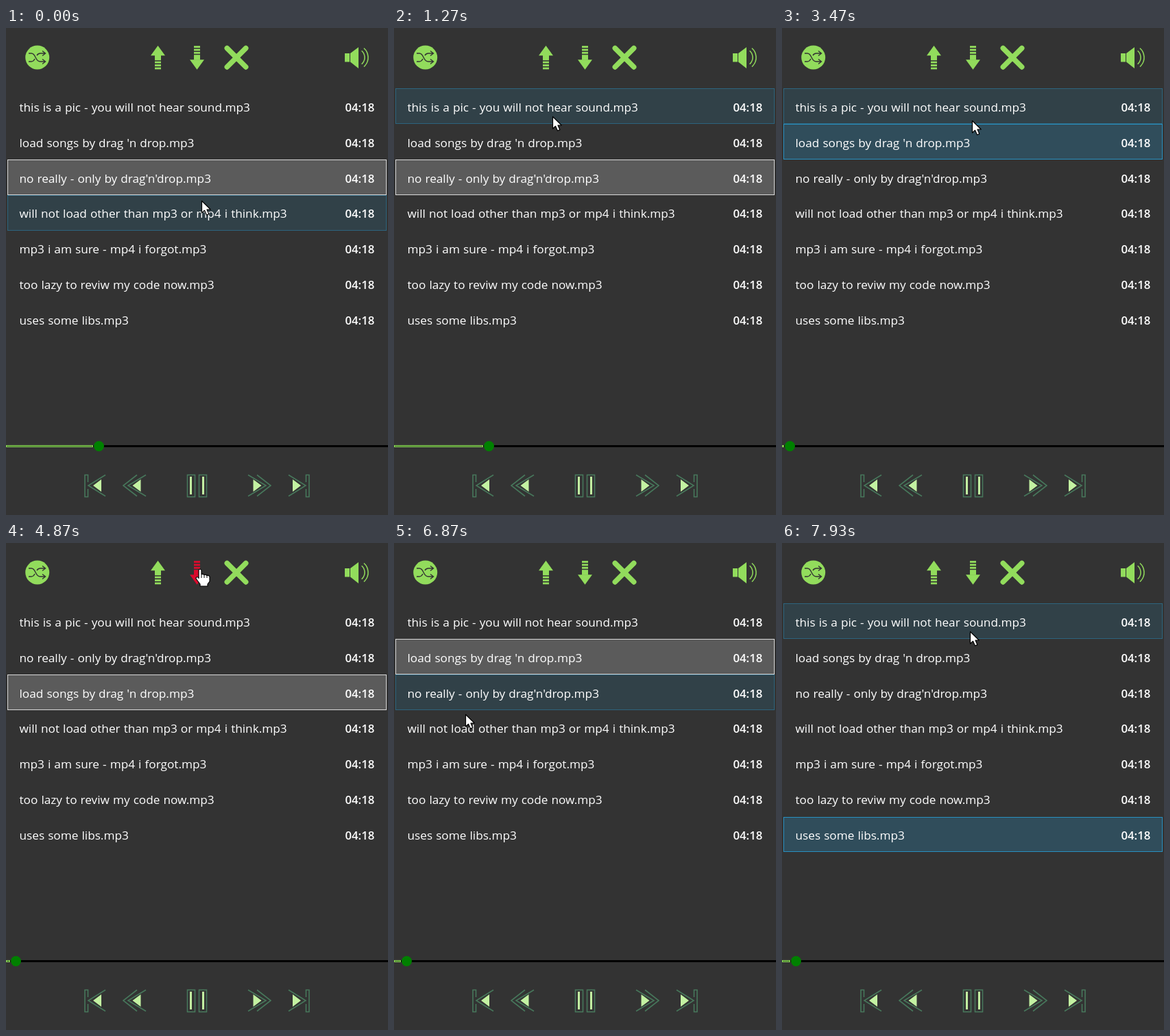
Write an HTML page with a canvas that moves like this. It is 557 by 711 pixels and loops after 8000 ms.

```html
<!DOCTYPE html>
<html lang="en">
<head>
<meta charset="utf-8">
<title>Music player</title>
<style>
  html, body { margin: 0; width: 100%; height: 100%; overflow: hidden; background: #333; }
  canvas { display: block; }
</style>
</head>
<body>
<canvas id="stage" width="557" height="711"></canvas>
<script>
const W = 557, H = 711, LOOP = 8000, STEP = 200 / 3;
const TOP = 88, PITCH = 51.85, MID = 668;
const ctx = document.getElementById('stage').getContext('2d');

const LIME = '#92dc5c', RED = '#dc0a2d', BG = '#333333';
const EDGE = '#47775b', GLOW = '#c3f2a2';

const songs = [
  'this is a pic - you will not hear sound',
  "load songs by drag 'n drop",
  "no really - only by drag'n'drop",
  'will not load other than mp3 or mp4 i think',
  'mp3 i am sure - mp4 i forgot',
  'too lazy to reviw my code now',
  'uses some libs'
];

const rowStyle = {
  hover: ['rgba(38,160,218,.122)', 'rgba(38,160,218,.45)'],
  idle: ['rgba(218,218,218,.24)', '#dadada'],
  active: ['rgba(38,160,218,.24)', 'rgba(38,160,218,.85)']
};

// Places the pointer heads for
const list = { x: 285, y: 252 }, up = { x: 226, y: 41 }, down = { x: 283, y: 38 };
const moves = [
  { from: 130, to: 600, ...up },
  { from: 600, to: 1000, x: 241, y: 89 },
  { from: 1000, to: 1270, x: 231, y: 129 },
  { from: 1400, to: 2200, x: 207, y: 163 },
  { from: 2600, to: 2800, x: 203, y: 169 },
  { from: 2930, to: 3470, x: 277, y: 135 },
  { from: 3470, to: 3800, x: 294, y: 38 },
  { from: 3800, to: 4600, ...down },
  { from: 5400, to: 5730, ...up },
  { from: 6470, to: 6870, x: 104, y: 250 },
  { from: 6870, to: 7530, x: 172, y: 424 },
  { from: 7600, to: 7900, x: 274, y: 129 }
];

const clicks = [2000, 4470, 4930, 5270, 6070, 6270, 6470, 7400];
const RESTART = 2470;

const ease = k => k * k * (3 - 2 * k);
const rowTop = i => Math.ceil(TOP + PITCH * i);

function pointerAt(t) {
  let { x, y } = list;
  for (const m of moves) {
    if (t <= m.from) break;
    const k = ease(Math.min(1, (t - m.from) / (m.to - m.from)));
    x += (m.x - x) * k;
    y += (m.y - y) * k;
  }
  return { x: Math.round(x), y: Math.round(y) };
}

function iconAt({ x, y }) {
  if (y < 25 || y > 61) return '';
  return Math.abs(x - 221.5) < 18 ? 'up' : Math.abs(x - 278.5) < 18 ? 'down' : '';
}

const rowAt = ({ y }) => Math.floor((y - TOP) / PITCH);

// Replays the clicks so far on a fresh list
function stateAt(t) {
  const order = songs.slice();
  let sel = 2, style = 'idle';
  for (const time of clicks.filter(c => c <= t)) {
    const p = pointerAt(time), icon = iconAt(p);
    if (icon) {
      const next = sel + (icon === 'up' ? -1 : 1);
      [order[sel], order[next]] = [order[next], order[sel]];
      sel = next;
      style = 'idle';
    } else {
      sel = rowAt(p);
      style = 'active';
    }
  }
  return { order, sel, style };
}

function sliderX(t) {
  const tick = Math.floor((t - 70) / 200) * 200 + 70;
  return Math.round(2.1 * tick / 1000 + (t < RESTART ? 134.95 : 3.373));
}

function poly(points, close) {
  ctx.beginPath();
  for (const [x, y] of points) ctx.lineTo(x, y);
  if (close) ctx.closePath();
}

function fillPoly(points, color) {
  ctx.fillStyle = color;
  poly(points, true);
  ctx.fill();
}

function line(points, color, width) {
  ctx.strokeStyle = color;
  ctx.lineWidth = width;
  poly(points);
  ctx.stroke();
}

function disc(x, y, r, color) {
  ctx.fillStyle = color;
  ctx.beginPath();
  ctx.arc(x, y, r, 0, 7);
  ctx.fill();
}

function rect(x, y, w, h, color) {
  ctx.fillStyle = color;
  ctx.fillRect(x, y, w, h);
}

function mirrored(draw) {
  draw();
  ctx.save();
  ctx.translate(W, 0);
  ctx.scale(-1, 1);
  draw();
  ctx.restore();
}

function shuffleIcon() {
  disc(45.7, 43, 17.5, LIME);
  ctx.strokeStyle = BG;
  ctx.lineWidth = 1.4;
  ctx.stroke(new Path2D('M33 37H37C44 37 42 49 50 49H57m-4-3.500l4.500 3.500l-4.500 3.500' +
    'M33 49H37Q40 49 42 45M45 40Q47 37 50 37H57m-4-3.500l4.500 3.500l-4.500 3.500'));
}

function arrowIcon(cx, flip, color) {
  ctx.save();
  ctx.translate(cx, 43.2);
  ctx.scale(1, flip);
  fillPoly([[0, -17.5], [10.5, -3], [-10.5, -3]], color);
  rect(-4.5, -3.5, 9, 7.5, color);
  for (let i = 0; i < 3; i++) rect(-4.5, 5.5 + 4.4 * i, 9, 2.8, color);
  ctx.restore();
}

function crossIcon(cx, cy, r) {
  ctx.lineCap = 'round';
  for (const s of [-1, 1]) line([[cx - r, cy - r * s], [cx + r, cy + r * s]], LIME, 7.5);
  ctx.lineCap = 'butt';
}

function speakerIcon() {
  rect(494, 37, 7, 12.5, LIME);
  fillPoly([[502, 37], [514, 28], [514, 59], [502, 49.5]], LIME);
  ctx.strokeStyle = LIME;
  ctx.lineWidth = 1.5;
  for (const r of [13, 18]) {
    ctx.beginPath();
    ctx.arc(510, 43, r, -0.85, 0.85);
    ctx.stroke();
  }
}

function toolbar(hot) {
  shuffleIcon();
  arrowIcon(221.5, 1, hot === 'up' ? RED : LIME);
  arrowIcon(278.5, -1, hot === 'down' ? RED : LIME);
  crossIcon(336, 43.2, 13.7);
  speakerIcon();
}

// Left-pointing shapes on the middle line of the controls
const wedge = (x, w, h) => [[x + w, MID - h], [x, MID], [x + w, MID + h]];

function glowWedge(x) {
  fillPoly(wedge(x, 12, 9), GLOW);
}

function skipIcon() {
  line([[119.5, 663], [119.5, 652.5], [115, 652.5], [115, 684.5], [119.5, 684.5], [119.5, 673]], EDGE, 1.6);
  line(wedge(120, 25, 15.5), EDGE, 1.6);
  glowWedge(127);
}

function seekIcon() {
  line(wedge(171, 20, 15.5), EDGE, 1.6);
  line(wedge(178, 26, 15.5), EDGE, 1.6);
  glowWedge(184.5);
}

function pauseBar() {
  ctx.strokeStyle = EDGE;
  ctx.lineWidth = 1.6;
  ctx.strokeRect(264.5, 652.5, 11, 32);
  rect(268, 655, 3, 26, GLOW);
}

function row(i, style) {
  const y = rowTop(i), h = rowTop(i + 1) - y;
  const [fill, edge] = rowStyle[style];
  rect(3, y + 1, 551, h - 2, fill);
  ctx.strokeStyle = edge;
  ctx.lineWidth = 1;
  ctx.strokeRect(2.5, y + 0.5, 552, h - 1);
}

function playlist(t) {
  const { order, sel, style } = stateAt(t);
  // The highlight trails the pointer slightly
  const hover = rowAt(pointerAt(t - 50));
  if (songs[hover] && hover !== sel) row(hover, 'hover');
  row(sel, style);

  ctx.fillStyle = '#fff';
  order.forEach((name, i) => {
    const y = Math.round(122 + 51.83 * i);
    ctx.font = '17.2px "Open Sans", "Noto Sans", sans-serif';
    ctx.wordSpacing = '0.6px';
    ctx.fillText(name + '.mp3', 19.5, y);
    ctx.font = '600 16.7px "Open Sans", "Noto Sans", sans-serif';
    ctx.fillText('04:18', 494.5, y);
  });
}

function slider(x) {
  rect(0, 609, W, 3, '#000');
  rect(0, 609, x - 8, 3, LIME);
  rect(1, 610, Math.max(0, x - 10), 1, '#2c5a1c');
  disc(x + 0.5, 610.5, 7.5, '#008000');
}

function cursor({ x, y }, hand) {
  ctx.save();
  ctx.translate(x, y);
  ctx.lineJoin = 'round';
  ctx.fillStyle = '#fff';
  ctx.strokeStyle = '#000';
  ctx.lineWidth = 1.2;
  const shape = new Path2D(hand
    ? 'M-2 1.500Q0 -1 2 1.500V8Q4 6.500 6 8.500Q8 7.500 10 9.500Q12 8.500 14 11V18L11 22V25H0V22L-6 14Q-6 11 -3 12L-2 13.500Z'
    : 'M.5 .5V18L4.500 14.300L7.500 21L10.800 19.600L8 13H13.300Z');
  ctx.fill(shape);
  ctx.stroke(shape);
  if (hand) for (const i of [2, 6, 10]) line([[i, 8.5], [i, 13]], '#000', 1);
  ctx.restore();
}

function draw(time) {
  // Everything moves in 15 steps a second
  const k = Math.min(119, Math.floor((time % LOOP + 3.4) / STEP));
  const t = Math.round(k * STEP / 10) * 10;
  const pointer = pointerAt(t), hot = iconAt(pointer);
  rect(0, 0, W, H, BG);
  toolbar(hot);
  playlist(t);
  slider(sliderX(t));
  [skipIcon, seekIcon, pauseBar].forEach(mirrored);
  cursor(pointer, hot);
}

const start = performance.now();
function loop() {
  draw(performance.now() - start);
  requestAnimationFrame(loop);
}
loop();
</script>
</body>
</html>
```
